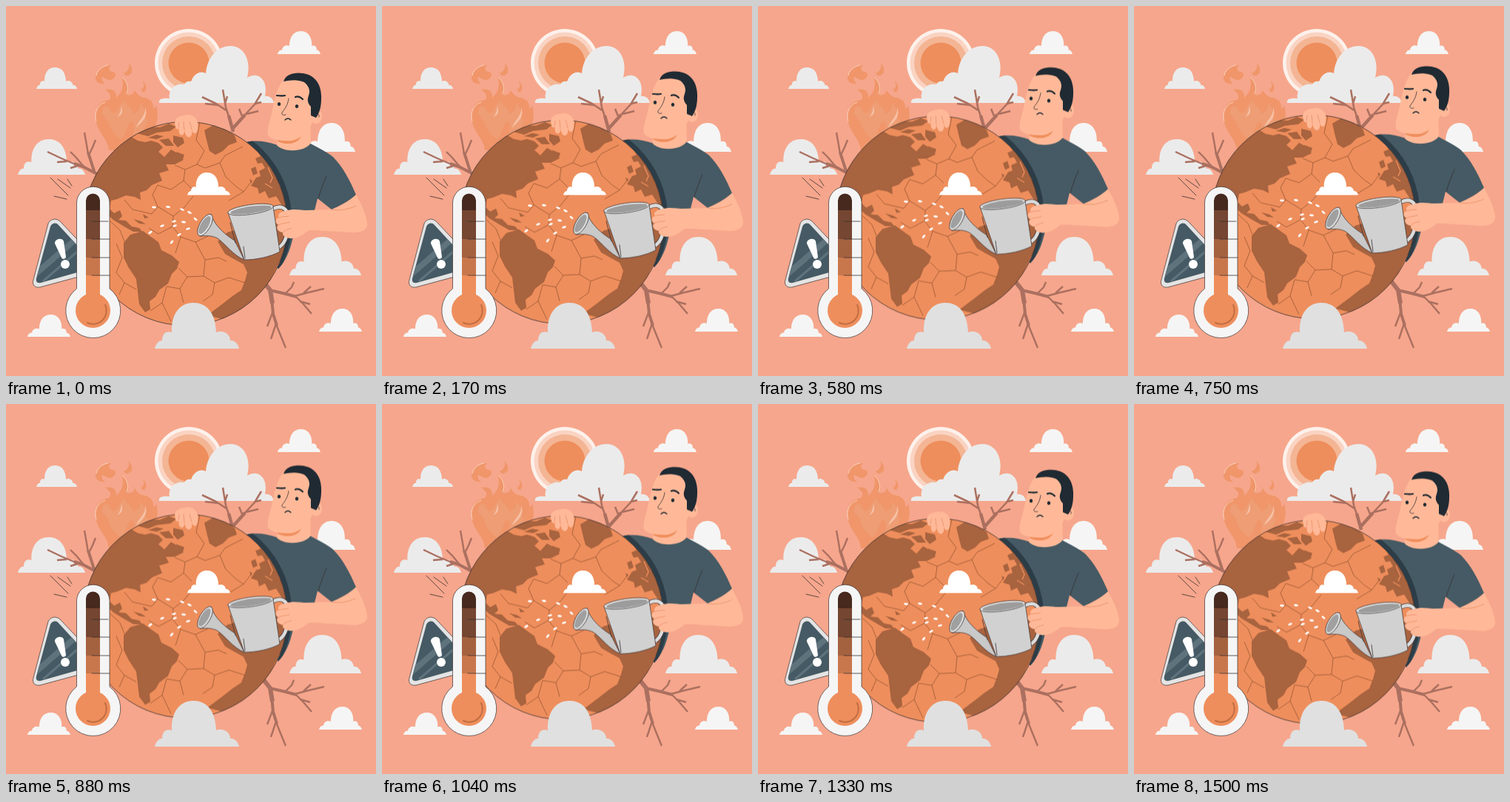
Write an HTML page that moves like this. It is 500 by 500 pixels and loops after 1.54 s.

```html
<!DOCTYPE html>
<html lang="en">
<head>
<meta charset="utf-8">
<title>Warming planet</title>
<style>
html, body { margin: 0; width: 100%; height: 100%; overflow: hidden; background: #f6a68c; }
svg { display: block; width: 100vw; height: 100vh; }
.line { fill: none; stroke: #3a3233; stroke-width: .8; stroke-linecap: round; stroke-linejoin: round; }
.edge { stroke: #3a3233; stroke-width: .7; stroke-linejoin: round; }
.twig { fill: none; stroke: #ab7060; stroke-linejoin: round; }
.crack { fill: none; stroke: #8f5130; stroke-width: .7; stroke-linejoin: round; }
.land { fill: #a8633f; }
.skin { fill: #ffb998; }
.dark { fill: #1f2a33; }
</style>
</head>
<body>
<svg viewBox="0 0 500 500">
  <defs>
    <path id="shirt" d="M325 184C338 181 353 183 367 188L408 184C420 191 434 197 442 204C455 217 465 236 473 255C463 264 451 270 440 275L421 260L416 280L388 312C384 330 378 345 368 355L300 300Z"/>
    <clipPath id="inShirt"><use href="#shirt"/></clipPath>
    <circle id="ball" cx="242.5" cy="294" r="137.700"/>
    <clipPath id="inGlobe"><use href="#ball"/></clipPath>
    <path id="sign" d="M57 294C60 287 69 286 74 292L125 346C130 352 127 358 120 360L46 380C39 381 35 377 37 370Z"/>
    <path id="signFace" d="M60 298C62 293 68 292 71 296L117 346C120 350 118 354 114 355L47 374C42 375 40 372 41 368Z"/>
    <clipPath id="inSign"><use href="#signFace"/></clipPath>
  </defs>

  <g id="sun">
    <circle cx="247" cy="77" r="46" fill="#fdf1eb"/>
    <circle cx="247" cy="77" r="41.500" fill="#fad3c2"/>
    <circle cx="247" cy="77" r="36" fill="#f4b594"/>
    <circle cx="247" cy="77" r="27.500" fill="#ee8e5c"/>
  </g>
  <path fill="#ebebeb" d="M207 131C206 126 210 124 221 125C219 112 229 104 241 106C243 102 246 101 250 102C254 91 263 87 270 91C272 68 287 54 303 54C321 54 332 72 326 97C339 88 355 98 350 122C356 121 361 125 362 131Z"/>
  <g id="clouds"></g>

  <g id="fire">
    <path fill="#f0966a" d="M139 195C138 178 121 170 121 149C121 137 127 128 139 127C144 123 140 117 134 113C146 111 150 117 149 124C157 117 160 108 156 95C165 102 168 111 164 121C170 120 173 118 174 114C178 120 181 123 188 124C194 125 200 130 199 139C202 138 203 136 203 134C208 153 201 162 199 172L188 195Z"/>
    <path fill="#ee9d74" d="M132 137C141 132 139 142 145 145C154 141 154 132 159 127C162 136 171 135 172 146C179 142 183 137 180 132C192 137 185 152 192 155C188 168 182 174 174 181C169 171 177 164 170 156C160 162 165 174 155 180C147 174 141 169 138 156C134 148 126 146 132 137Z"/>
    <path fill="#f6bfa3" d="M176 164C179 154 189 149 188 137C193 149 184 157 176 164ZM150 150C155 145 155 140 156 135C159 144 156 148 150 150Z"/>
    <path fill="#f0966a" d="M121 97C122 86 131 79 142 80C137 83 139 89 145 89C152 91 146 101 139 100C135 99 133 96 130 96C129 101 131 103 134 105C127 106 121 103 121 97ZM159 91C166 88 167 82 166 77C171 83 172 90 167 93C164 95 161 94 159 91ZM183 113C187 110 187 106 185 102C190 106 191 112 187 116C185 117 183 115 183 113Z"/>
    <path fill="none" stroke="#fbd9ca" stroke-width=".9" d="M122 156C118 143 125 133 134 130M122 94C123 87 130 81 138 80M157 96C164 103 167 111 163 119"/>
  </g>

  <g class="twig">
    <path stroke-width="4" d="M123 227L104 217 92 213M120 226L111 198"/>
    <path stroke-width="2.4" d="M94 214L75 206 56 197M82 210L69 211M111 200L109 188 106 171M112 201L117 191 121 181M105 217L95 205 87 197M100 215L87 219"/>
    <path stroke-width="4.500" d="M307 170L301 148M306 166L323 147"/>
    <path stroke-width="2.500" d="M302 152L297 137 293 113M299 142L284 132 265 123M287 134L269 132M296 132L299 122M322 148L336 133 345 118M320 151L315 139M325 146L341 142M337 132L345 130"/>
    <path stroke-width="6" d="M346 370L357 384 360 402"/>
    <path stroke-width="4" d="M356 384L374 388 393 393M359 395L361 416 366 432"/>
    <path stroke-width="2.400" d="M390 392L409 387 430 382M378 388L386 380 389 373M402 388L412 379M390 391L402 403 413 416M397 399L411 403M361 412L353 433M365 429L358 450M365 430L371 445 378 462"/>
  </g>

  <g id="float">
    <use href="#shirt" fill="#455a64"/>
    <circle cx="249" cy="291" r="137.500" fill="#2c3d47" clip-path="url(#inShirt)"/>
    <path class="line" d="M433 230C429 239 425 250 422 260"/>
    <!-- head -->
    <path class="skin" d="M367 171L366 188C374 198 404 198 412 185L411 152Z"/>
    <path fill="#f08f5d" d="M366 178C377 185 390 183 399 176C395 186 380 189 367 183Z"/>
    <path class="skin" d="M376 99C367 107 363 126 359 145C356 158 351 170 355 176C361 183 384 184 395 178C406 172 411 164 414 157C420 162 427 157 427 149C427 140 420 137 415 143L411 100Z"/>
    <path class="dark" d="M375 102C378 92 390 89 402 91C419 94 427 108 426 126C426 137 423 146 419 151L412 148L412 136C407 131 407 126 409 121C412 113 408 107 403 103C394 99 385 100 375 102Z"/>
    <path class="line" d="M417 148C421 144 424 146 423 150M382 125C381 134 376 140 373 144C372 147 375 148 378 147"/>
    <g fill="none" stroke="#1f2a33" stroke-width="2.200" stroke-linecap="round">
      <path d="M366 121C370 121 373 122 377 121M391 123C395 121 398 123 401 126"/>
      <path stroke-width="1.300" d="M377 154C380 151 383 152 385 154"/>
    </g>
    <ellipse class="dark" cx="369" cy="132.500" rx="2.200" ry="2.600"/>
    <ellipse class="dark" cx="393" cy="135.500" rx="2.200" ry="2.600"/>

    <!-- globe -->
    <use href="#ball" fill="#ee8e5c"/>
    <g clip-path="url(#inGlobe)">
      <g class="land">
        <path d="M100 265L110 210 150 175 168 176 178 182 188 184 196 182 206 185 212 191 206 197 214 204 223 194 232 199 240 208 228 214 216 214 220 222 207 226 211 236 197 242 190 249 181 252 182 262 174 258 162 256 150 261 142 263 140 274 146 280 154 276 157 284 152 289 162 290 170 298 180 300 184 305 172 305 158 297 145 289 130 275Z"/>
        <path d="M177 172L194 163 208 164 220 159 230 163 222 169 204 171 192 176ZM226 175L239 178 241 185 232 191 226 184ZM207 181L220 179 227 189 216 189ZM192 178L203 174 213 176 204 180ZM230 197L241 201 239 207 231 206Z"/>
        <path d="M268 168L280 161 296 165 309 175 312 184 301 188 293 196 283 201 275 196 272 185Z"/>
        <path d="M159 320L168 309 185 304 196 312 206 319 210 330 224 337 234 346 231 355 224 362 219 375 207 384 202 393 194 399 195 410 188 414 180 403 178 386 176 369 166 354 159 340Z"/>
        <path d="M172 288L183 291 189 295 180 294ZM185 281L193 286 187 287Z"/>
        <path d="M286 318L299 306 318 300 390 290 390 360 340 415 300 425 272 418 292 403 306 392 318 384 323 371 326 360 321 349 308 342 296 335Z"/>
        <path d="M331 243L338 232 344 230 342 223 350 219 346 212 340 213 337 206 344 203 338 193 352 198 366 222 382 255 386 280 372 268 365 257 355 260 350 250 342 254 340 246Z"/>
        <path d="M331 220L337 217 340 226 334 229ZM329 234L333 236 331 240Z"/>
      </g>
      <path fill="none" stroke="#ee8e5c" stroke-width="1.400" d="M354 218L360 232 357 239M350 240L360 246M356 374L370 346"/>
      <g class="crack">
        <path d="M262 157L257 181 268 196 258 214 242 221 240 236 223 248 205 242M258 214L269 219 289 212 296 202 320 190"/>
        <path d="M289 212L297 231 311 244M242 221L228 215M240 236L251 247M205 242L198 255 205 271 226 284 241 272 253 257M226 284L225 298 206 308 193 300"/>
        <path d="M225 298L236 312 256 319 273 311M236 312L229 334M256 319L269 343 267 365 245 366 233 354M269 343L287 340 298 345"/>
        <path d="M267 365L282 374 301 367 323 374M282 374L279 390 266 399M245 366L235 382 217 379M235 382L240 401M217 379L211 401 223 426M195 412L211 401"/>
        <path d="M301 263L321 251 331 238M311 244L321 251M141 291L154 303 160 318M149 321L157 340 149 360 160 374 176 383M160 374L153 390M160 262L171 275 197 281M197 281L205 271"/>
      </g>
    </g>
    <use href="#ball" class="line"/>

    <!-- resting hand -->
    <path class="skin" d="M229 163C226 154 231 149 240 148C249 145 257 149 259 157C260 164 259 171 256 172C253 173 252 170 251 167C252 174 250 178 246 177C243 176 242 172 241 168C241 173 239 176 236 174C233 172 234 168 233 164C233 168 230 167 229 163Z"/>
    <path fill="none" stroke="#e98f67" stroke-width=".8" d="M233 164L234 157M241 168L240 156M251 167L248 156"/>

    <g id="drops" fill="#fff"></g>

    <!-- watering can -->
    <g fill="none">
      <path id="handle" stroke="#3a3233" stroke-width="6" d="M361 274C373 268 380 274 381 285C382 303 380 319 369 326"/>
      <path stroke="#dcdcdc" stroke-width="4.700" d="M361 274C373 268 380 274 381 285C382 303 380 319 369 326"/>
    </g>
    <path class="edge" fill="#c9c9c9" d="M277 281C281 296 296 309 309 317L322 343C307 337 297 322 286 314C277 309 268 311 262 311Z"/>
    <path class="edge" fill="#d1d1d1" d="M300 279L361 271 370 332C357 339 338 343 322 343Z"/>
    <ellipse class="edge" cx="330.500" cy="275" rx="31" ry="6.500" transform="rotate(-8 330.5 275)" fill="#e0e0e0"/>
    <ellipse cx="331" cy="275.500" rx="28" ry="4.700" transform="rotate(-8 331 275.5)" fill="#9c9c9c"/>
    <ellipse class="edge" cx="269" cy="296" rx="16.500" ry="7.200" transform="rotate(-60 269 296)" fill="#dedede"/>
    <ellipse cx="268.400" cy="296" rx="13.500" ry="5.200" transform="rotate(-60 268.4 296)" fill="#a0a0a0"/>
    <path class="line" d="M303 293L310 320M321 325L323 341"/>

    <!-- pouring arm -->
    <path class="skin" d="M440 275C452 271 464 264 473 255C481 269 487 283 488 293C489 303 480 307 466 306C445 305 426 303 409 303C402 309 395 314 385 314C378 314 373 310 374 306C367 305 364 299 368 296C363 292 364 287 369 286C366 282 370 278 377 277C389 273 397 276 407 276Z"/>
    <path fill="none" stroke="#e98f67" stroke-width=".8" d="M369 286C374 284 378 285 382 284M368 296C373 293 378 294 383 292M374 306C379 301 382 302 386 300M440 275C451 277 462 275 473 270"/>
  </g>

  <g id="front"></g>

  <path class="line" d="M60 232L84 256M70 234L87 246M83 234L89 243M65 257L82 261"/>
  <use href="#sign" class="edge" fill="#e4e4e4"/>
  <use href="#signFace" fill="#455a64"/>
  <g clip-path="url(#inSign)" fill="none" stroke="#5f737d">
    <path stroke-width="8" d="M40 362L98 312"/>
    <path stroke-width="3" d="M50 372L110 320"/>
  </g>
  <path fill="#fff" d="M66 321C65 315 76 312 78 318L81 339C81 342 76 343 75 340Z"/>
  <circle cx="80" cy="349" r="6" fill="#fff"/>

  <g id="thermometer">
    <path class="edge" fill="#f5f5f5" d="M95.500 382V265A22.300 22.300 0 0 1 140 265V382A37 37 0 1 1 95.500 382Z"/>
    <path fill="#47291e" d="M108 278V263A9.500 9.500 0 0 1 127 263V278Z"/>
    <path fill="#754631" d="M108 276H127V316H108Z"/>
    <path fill="#a5623f" d="M108 315H127V341H108Z"/>
    <path fill="#c8774c" d="M108 340H127V365H108Z"/>
    <path fill="#ee8e5c" d="M108 364H127V400H108Z"/>
    <circle cx="117.500" cy="411.500" r="23.500" fill="#ee8e5c"/>
    <path fill="none" stroke="#c46f42" stroke-width="2" stroke-linecap="round" d="M110 428A18 18 0 0 0 134 404"/>
    <path class="line" d="M116 291H138M116 315H140M116 340H140M116 364H140"/>
  </g>
  <g id="near"></g>
</svg>
<script>
const NS = "http://www.w3.org/2000/svg";
const byId = id => document.getElementById(id);

function add(parent, tag, attrs) {
  const el = document.createElementNS(NS, tag);
  for (const key in attrs) el.setAttribute(key, attrs[key]);
  byId(parent).append(el);
}

// Places the shared 114 x 62 cloud outline in the given box.
function cloud(parent, x, y, w, h, fill, mirrored = false) {
  const sx = w / 114;
  add(parent, "path", {
    d: "M0 62C2 55 5 51 10 51C10 43 14 37 23 40C22 15 34 0 52 0C70 0 82 13 83 40C92 36 102 42 102 51C108 50 113 56 114 62Z",
    transform: `translate(${mirrored ? x + w : x} ${y}) scale(${mirrored ? -sx : sx} ${h / 62})`,
    fill
  });
}

cloud("clouds", 41, 83, 55, 29, "#ebebeb");
cloud("clouds", 16, 180, 91, 48, "#ebebeb");
cloud("clouds", 367, 34, 58, 31, "#f5f5f5", true);
cloud("clouds", 402, 158, 70, 39, "#f5f5f5", true);
cloud("clouds", 383, 312, 97, 52, "#ebebeb");
cloud("clouds", 423, 409, 58, 31, "#f5f5f5", true);
cloud("clouds", 29, 417, 58, 30, "#f5f5f5", true);
cloud("front", 245, 225, 58, 30.5, "#fff");
cloud("near", 201, 401, 114, 62, "#e0e0e0");

const drops = [
  [200, 272, 3], [219, 271.5, 8], [238, 275, 18], [248, 279, 25], [256, 288, 40],
  [227, 291, -14], [240, 292, 5], [211, 297, -22], [228, 297, -18],
  [195, 306, -35], [246, 301, -15], [234, 309, -30], [224, 319, -50]
];
for (const [cx, cy, turn] of drops)
  add("drops", "ellipse", { cx, cy, rx: 3, ry: 1.4, transform: `rotate(${turn} ${cx} ${cy})` });

byId("float").animate(
  [.5, -9.5, .5].map(y => ({ transform: `translateY(${y}px)` })),
  { duration: 1540, delay: -40, iterations: Infinity, easing: "linear" }
);
</script>
</body>
</html>
```
